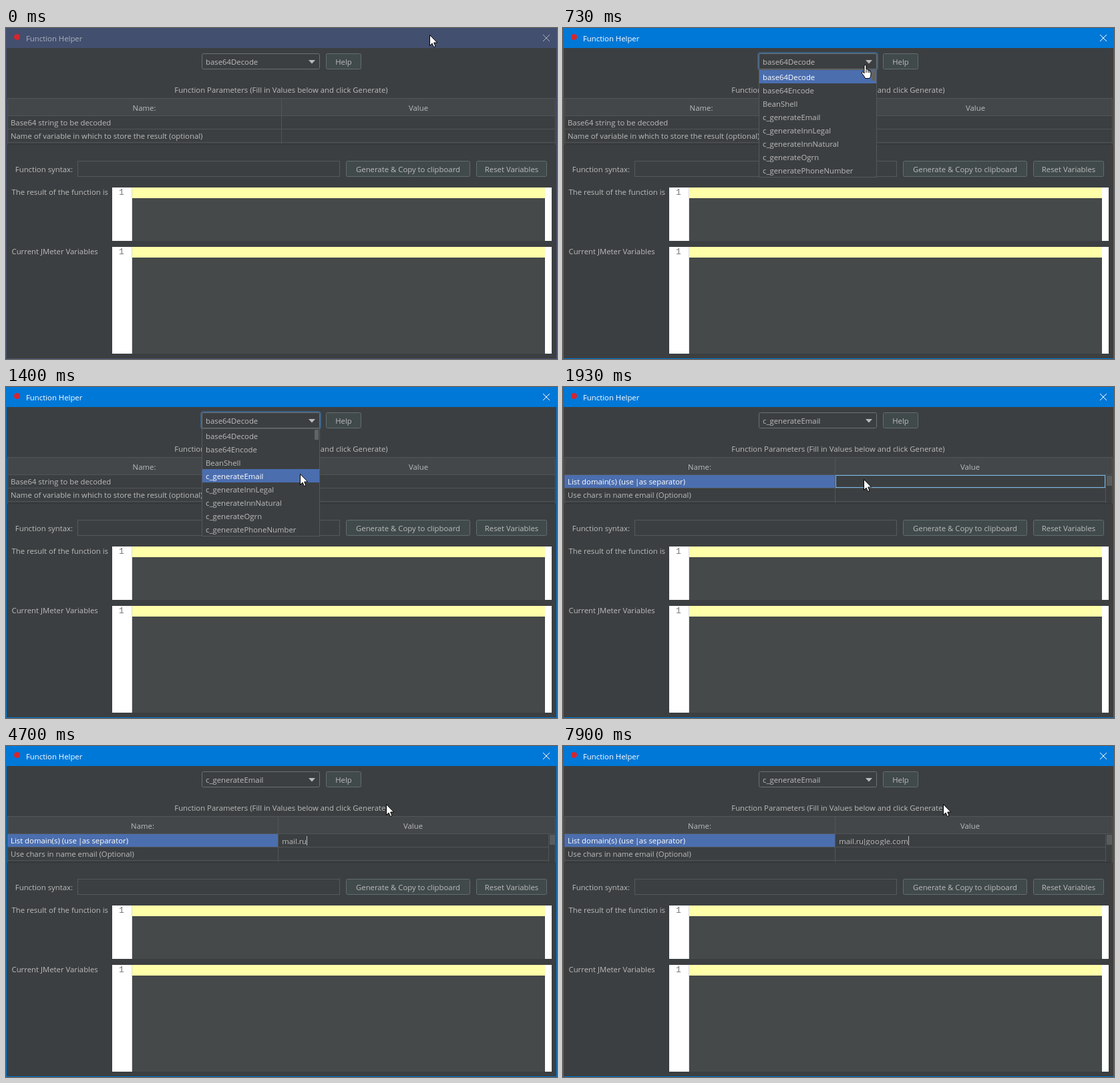
Write an HTML page with a canvas that moves like this. It is 825 by 496 pixels and loops after 8 s.

```html
<!DOCTYPE html>
<html lang="en">
<head>
<meta charset="utf-8">
<title>Function Helper</title>
<style>
html, body { margin: 0; width: 100%; height: 100%; overflow: hidden; background: #3c3f41; }
canvas { display: block; }
</style>
</head>
<body>
<canvas id="stage" width="825" height="496"></canvas>
<script>
const ctx = document.getElementById('stage').getContext('2d');
const LOOP = 8000;
const ACTIVE = 530, PICKED = 1570, SELECTED = 1830, EDITING = 2100;
const BG = '#3c3f41', PANE = '#45494a', LINE = '#515557', TEXT = '#bbbbbb', BLUE = '#4b6eaf';
const UI = '11.35px "Open Sans", "Noto Sans", sans-serif';
const MONO = '13px "Liberation Mono", monospace';

const items = ['base64Decode', 'base64Encode', 'BeanShell', 'c_generateEmail', 'c_generateInnLegal',
  'c_generateInnNatural', 'c_generateOgrn', 'c_generatePhoneNumber'];

// time, x, y of the pointer
const path = [[30, 634, 10], [470, 452, 55], [700, 452, 55], [1030, 433, 86], [1400, 440, 130],
  [1570, 440, 130], [1800, 450, 138], [1970, 450, 138], [2370, 569, 87]];

// time, typed character, caret position after it
const keys = [[2970, 'm', 424], [3170, 'a', 430], [3270, 'i', 433], [3370, 'l', 436], [3770, '.', 439],
  [4570, 'r', 443], [4700, 'u', 450], [5030, '|', 453], [5730, 'g', 460], [5970, 'o', 467],
  [6130, 'o', 474], [6300, 'g', 481], [6530, 'l', 484], [6670, 'e', 490], [7070, '.', 493],
  [7570, 'c', 499], [7830, 'o', 506], [7900, 'm', 517]];

const arrow = new Path2D('M.5.5V16.5L4 13 6.5 18.5 9 17.5 6.7 12H11.7Z');
const hand = new Path2D('M5 13V2q0-1.5 1.5-1.5T8 2v5q3-.5 3 1 2.5-.3 2.5 1.2 1.5-.2 1.5 1.5V15q0 3-2 5.5H6.5Q5 17 2 13.5 .5 11.5 2 10.8T5 13Z');

function rect(x, y, w, h, color) {
  ctx.fillStyle = color;
  ctx.fillRect(x, y, w, h);
}

function frame(x, y, w, h, color) {
  ctx.strokeStyle = color;
  ctx.lineWidth = 1;
  ctx.strokeRect(x + .5, y + .5, w - 1, h - 1);
}

function text(str, x, y, color = TEXT, align = 'left', font = UI) {
  ctx.font = font;
  ctx.textAlign = align;
  ctx.fillStyle = color;
  ctx.fillText(str, x, y);
}

function box(x, y, w, h, fill, border, radius = 2) {
  ctx.beginPath();
  ctx.roundRect(x + .5, y + .5, w - 1, h - 1, radius);
  ctx.fillStyle = fill;
  ctx.fill();
  ctx.strokeStyle = border;
  ctx.lineWidth = 1;
  ctx.stroke();
}

function button(label, x, y, w) {
  box(x, y, w, 24, '#414a4b', '#626d6f');
  text(label, x + w / 2, y + 17, TEXT, 'center');
}

function editor(y, h) {
  rect(159, y, 658, h, '#ffffff');
  rect(188, y, 1, h, '#dddddd');
  rect(189, y, 618, h, PANE);
  rect(189, y, 618, 16, '#ffffaa');
  text('1', 169, y + 11, '#787878', 'left', MONO);
}

function pointer(t) {
  const i = path.findIndex(p => p[0] > t);
  if (i === 0) return path[0].slice(1);
  if (i < 0) return path[path.length - 1].slice(1);
  const [t0, x0, y0] = path[i - 1], [t1, x1, y1] = path[i];
  const u = (t - t0) / (t1 - t0), k = u * u * (3 - 2 * u);
  return [x0 + (x1 - x0) * k, y0 + (y1 - y0) * k];
}

function drawTitle(active) {
  const bar = active ? '#0078d7' : '#434f6e';
  const ink = active ? '#ffffff' : '#aab0be';
  rect(0, 0, 825, 496, bar);
  rect(1, 30, 823, 465, BG);
  ctx.fillStyle = '#d4262f';
  ctx.beginPath();
  ctx.arc(16.5, 13.5, 4.5, 0, 7);
  ctx.fill();
  text('Function Helper', 30, 20, ink);
  ctx.strokeStyle = ink;
  ctx.lineWidth = 1;
  ctx.beginPath();
  ctx.moveTo(804, 10); ctx.lineTo(814, 20);
  ctx.moveTo(814, 10); ctx.lineTo(804, 20);
  ctx.stroke();
}

function drawCombo(t) {
  if (t >= ACTIVE && t < SELECTED) box(291, 36, 181, 28, '#3d6185', '#3d6185', 4);
  box(293, 38, 177, 24, BG, '#6a7072');
  text(items[t < PICKED ? 0 : 3], 299, 55);
  ctx.fillStyle = TEXT;
  ctx.beginPath();
  ctx.moveTo(453, 48); ctx.lineTo(463, 48); ctx.lineTo(458, 53.5);
  ctx.fill();
}

function drawTable(t) {
  const picked = t >= PICKED, split = picked ? 407 : 412, right = picked ? 812 : 823;
  rect(2, 105, 821, 1, LINE);
  rect(2, 106, 821, 25, '#43474a');
  rect(2, 131, 821, 1, '#515557');
  rect(2, 151, right - 2, 1, LINE);
  rect(2, 171, right - 2, 1, LINE);
  rect(2, 174, 821, 1, '#323537');
  rect(split, 106, 1, 68, LINE);
  rect(2, 105, 1, 70, LINE);
  rect(822, 105, 1, 70, LINE);
  text('Name:', (split + 2) / 2, 124, TEXT, 'center');
  text('Value', (split + right) / 2, 124, TEXT, 'center');

  if (!picked) {
    text('Base64 string to be decoded', 7, 146);
    text('Name of variable in which to store the result (optional)', 7, 166);
    return;
  }
  rect(812, 132, 1, 42, LINE);
  rect(814, 133, 8, 15, '#585c5e');
  const selected = t >= SELECTED, ink = selected ? '#ffffff' : TEXT;
  if (selected) rect(2, 132, 405, 19, BLUE);
  text('List domain(s) (use', 7, 146, ink);
  text('|', 111, 146, ink, 'center');
  text('as separator)', 183, 146, ink, 'right');
  text('Use chars in name email (Optional)', 7, 166);
  if (selected && t < EDITING) frame(408, 132, 404, 19, '#7ab8e6');
  if (t >= EDITING) drawInput(t);
}

function drawInput(t) {
  ctx.save();
  ctx.beginPath();
  ctx.rect(408, 132, 404, 17);
  ctx.clip();
  let caret = 413, last = EDITING;
  for (const [time, char, x] of keys) {
    if (time > t) break;
    text(char, (caret + x) / 2, 147, TEXT, 'center');
    caret = x;
    last = time;
  }
  if ((t - last) % 1000 < 500) rect(caret, 135, 1, 14, TEXT);
  ctx.restore();
}

function drawPopup(y) {
  rect(293, 63, 177, 161, BG);
  const hover = Math.max(0, Math.floor((y - 63) / 20));
  rect(294, 63 + hover * 20, 175, 20, BLUE);
  items.forEach((name, i) => text(name, 299, 78 + i * 20, i === hover ? '#ffffff' : TEXT));
  rect(462, 64, 6, 15, '#606466');
  frame(293, 62, 177, 162, '#56595b');
}

function drawPointer(x, y) {
  const overCombo = x > 293 && x < 470 && y > 38 && y < 62;
  ctx.save();
  ctx.translate(Math.round(x) - (overCombo ? 6 : 0), Math.round(y) - (overCombo ? 1 : 0));
  const shape = overCombo ? hand : arrow;
  ctx.fillStyle = '#ffffff';
  ctx.strokeStyle = '#000000';
  ctx.lineWidth = 1;
  ctx.fill(shape);
  ctx.stroke(shape);
  if (overCombo) {
    ctx.beginPath();
    for (const px of [8, 11, 13.2]) { ctx.moveTo(px, 8); ctx.lineTo(px, 12); }
    ctx.stroke();
  }
  ctx.restore();
}

function draw(now) {
  const t = now % LOOP, [x, y] = pointer(t);
  drawTitle(t >= ACTIVE);
  drawCombo(t);
  button('Help', 479, 38, 53);
  text('Function Parameters (Fill in Values below and click Generate)', 412, 97, TEXT, 'center');
  drawTable(t);
  text('Function syntax:', 100, 216, TEXT, 'right');
  frame(107, 199, 393, 24, '#55595b');
  button('Generate & Copy to clipboard', 509, 199, 186);
  button('Reset Variables', 704, 199, 106);
  text('The result of the function is', 8.5, 250);
  editor(239, 80);
  text('Current JMeter Variables', 8.5, 339);
  editor(328, 160);
  if (t >= ACTIVE && t < PICKED) drawPopup(y);
  drawPointer(x, y);
  requestAnimationFrame(draw);
}
requestAnimationFrame(draw);
</script>
</body>
</html>
```
